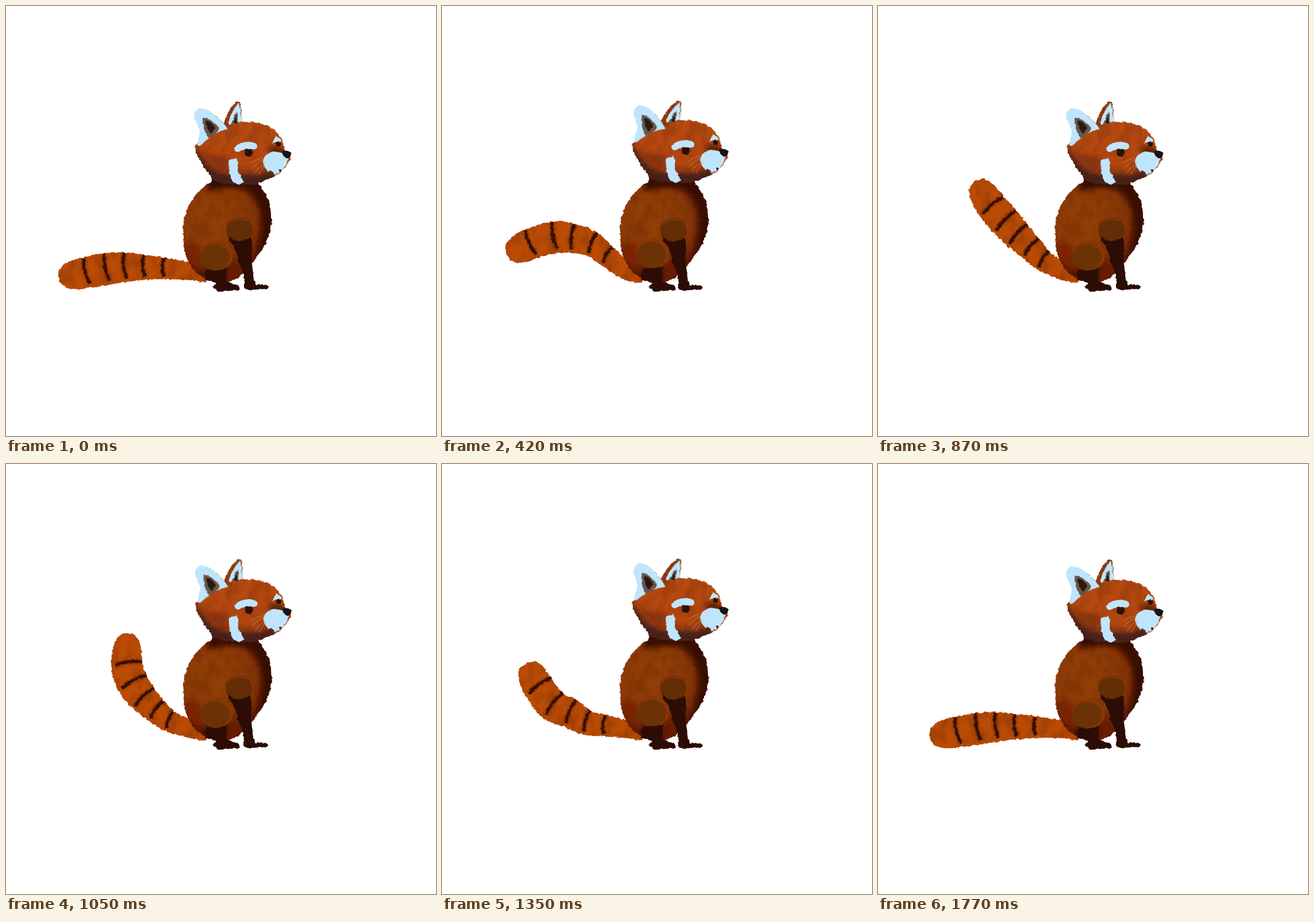
Recreate the animation shown at these times as an HTML page. Size 748 px wide and 748 px high, loop 1800 ms.

```html
<!DOCTYPE html>
<html lang="en">
<head>
<meta charset="utf-8">
<title>Red panda</title>
<style>
  html, body { margin: 0; width: 100%; height: 100%; overflow: hidden; background: #fff; }
  svg { display: block; width: 100vw; height: 100vh; }
  .line { fill: none; stroke-linecap: round; stroke-linejoin: round; }
  .ring { fill: none; }
</style>
</head>
<body>
<svg viewBox="0 0 748 748">
  <defs>
    <!-- ragged edge plus faint mottling -->
    <filter id="fur" color-interpolation-filters="sRGB">
      <feTurbulence type="fractalNoise" baseFrequency=".17" numOctaves="3" result="grain"/>
      <feDisplacementMap in="SourceGraphic" in2="grain" scale="5" xChannelSelector="R" yChannelSelector="G" result="shape"/>
      <feTurbulence type="fractalNoise" baseFrequency=".05 .035" numOctaves="3" seed="4"/>
      <feColorMatrix values="0 0 0 0 .25  0 0 0 0 .08  0 0 0 0 0  .6 0 0 0 -.25"/>
      <feComposite in2="shape" operator="atop"/>
    </filter>
    <filter id="rough" color-interpolation-filters="sRGB">
      <feTurbulence type="fractalNoise" baseFrequency=".17" numOctaves="2" result="grain"/>
      <feDisplacementMap in="SourceGraphic" in2="grain" scale="3.5" xChannelSelector="R" yChannelSelector="G"/>
    </filter>
    <filter id="soft"><feGaussianBlur stdDeviation="4"/></filter>
    <radialGradient id="coat" gradientUnits="userSpaceOnUse" cx="366" cy="372" r="98">
      <stop offset="0" stop-color="#944006"/>
      <stop offset=".6" stop-color="#8b3905"/>
      <stop offset=".85" stop-color="#702505"/>
      <stop offset="1" stop-color="#4c1405"/>
    </radialGradient>
    <linearGradient id="face" x1=".55" y1="0" x2=".42" y2="1">
      <stop offset="0" stop-color="#b94c10"/>
      <stop offset=".65" stop-color="#b0450f"/>
      <stop offset=".85" stop-color="#903710"/>
      <stop offset="1" stop-color="#4a211a"/>
    </linearGradient>
    <clipPath id="trunk"><path d="M364 292L357 305C326 326 310 350 308 388C307 414 312 440 322 452C334 470 350 480 380 481C400 479 412 468 430 445C448 422 462 402 462 368C462 345 453 325 438 308L434 292Z"/></clipPath>
    <clipPath id="skull"><path d="M329 243C338 233 360 222 383 211C405 197 440 198 465 214C477 223 483 238 484 250L495 260C494 272 488 283 465 297Q446 307 432 310Q385 313 358 302C350 282 330 268 329 243Z"/></clipPath>
  </defs>

  <g filter="url(#fur)">
    <path id="tail" fill="#ba4b04"/>
    <path id="shade" class="ring" stroke="#7a2e04" stroke-width="11" opacity=".35"/>
    <path id="rings" class="ring" stroke="#381002" stroke-width="5.5"/>
  </g>

  <g id="body">
    <g filter="url(#fur)"><g clip-path="url(#trunk)">
      <path fill="url(#coat)" d="M300 285H470V490H300Z"/>
      <g filter="url(#soft)">
        <path fill="#390e05" d="M350 285H470V400L435 445L445 385Q446 340 418 320Q390 312 350 322Z"/>
        <path fill="#7c2204" d="M312 420Q325 405 340 420L338 470Z"/>
        <path fill="#6a1c05" d="M385 455L430 445L400 485L380 482Z"/>
        <path fill="#35100a" d="M340 466L385 462L380 486L350 482Z"/>
      </g>
    </g></g>
  </g>

  <g id="foreleg" filter="url(#rough)">
    <circle cx="406" cy="390" r="23" fill="#632d05"/>
    <path class="line" d="M385 378Q403 363 426 374" stroke="#7d3308" stroke-width="5"/>
    <path fill="#2c0c05" d="M388 400Q398 412 410 408L427 403Q429 425 427 443Q430 462 431 478L436 485Q450 482 457 488L455 492L422 494Q414 492 413 487L415 476Q412 458 404 445Q402 425 388 407Z"/>
  </g>
  <g filter="url(#rough)">
    <path fill="#2c0c05" d="M350 456L385 454L383 478L393 483L405 487L407 494L370 497L360 489L366 482L346 476Z"/>
    <g id="thigh">
      <ellipse cx="366" cy="434" rx="29" ry="26" fill="#873606"/>
      <ellipse cx="363" cy="437" rx="26" ry="23" fill="#6b3205"/>
    </g>
  </g>

  <g id="head">
    <g id="farEar" filter="url(#rough)">
      <path fill="#8b390c" d="M378 207Q384 182 401 166L407 167L411 204L385 214Z"/>
      <path fill="#bfe5fd" d="M405 168L411 202L387 206Q389 186 405 168Z"/>
      <path fill="#5e4a3f" d="M401 184L404 203L392 205Z"/>
      <path fill="#2c1a12" d="M400 192L402 203L395 205Z"/>
    </g>
    <g filter="url(#fur)"><g clip-path="url(#skull)">
      <path fill="url(#face)" d="M320 190H500V320H320Z"/>
      <g filter="url(#soft)">
        <path fill="#46201a" d="M322 238L335 254Q348 279 375 292L440 294L468 286L470 315H340Z"/>
        <path fill="#80300e" d="M338 248Q352 262 390 262L388 290Q352 282 338 248Z" opacity=".6"/>
        <path fill="#3a1206" d="M452 251L462 246L484 248L488 257L464 254Z"/>
      </g>
    </g></g>
    <g id="nearEar" filter="url(#rough)">
      <path fill="#8b390c" d="M345 179Q368 190 384 211L376 218Z"/>
      <path fill="#bfe5fd" d="M327 187Q331 178 342 178L351 181Q370 194 386 213L363 222Q349 231 338 244L333 241L337 216Q327 200 327 187Z"/>
      <path fill="#69564a" d="M342 194Q360 197 371 213Q362 228 352 229Q341 214 342 194Z"/>
      <path fill="#2b1a13" d="M347 198Q360 202 364 213L357 222Q346 211 347 198Z"/>
    </g>
    <g filter="url(#rough)">
      <path class="line" stroke="#bfe5fd" stroke-width="12" d="M403 248Q417 239 431 244"/>
      <path fill="#bfe5fd" d="M462 240L466 233L469 226L475 229L479 236Q470 235 462 240Z"/>
      <path fill="#bfe5fd" d="M388 267L401 264Q404 275 403 286L414 306L405 311Q393 309 390 296Q386 282 388 267Z"/>
      <path fill="#bfe5fd" d="M447 270Q450 256 466 253L482 256L491 265Q490 282 467 294Q464 285 456 287Q448 281 447 270Z"/>
      <path fill="#2c1009" d="M415 255Q416 247 424 248Q431 251 428 258Q422 265 415 259Z"/>
      <ellipse cx="474" cy="240" rx="4.5" ry="4.5" fill="#2c1009"/>
      <path fill="#14151a" d="M480 253Q488 249 496 255Q496 265 488 265Q481 261 480 253Z"/>
      <circle cx="477" cy="286" r="2" fill="#4a1710"/>
    </g>
    <path class="line" stroke="#c79a6c" stroke-width=".9" opacity=".75" d="M449 267Q437 272 427 283M451 272Q440 280 432 291M452 276Q444 284 440 293M447 264Q437 266 426 273"/>
  </g>
</svg>
<script>
const LOOP = 1800;
const $ = id => document.getElementById(id);
const root = [[352, 471], [322, 462]];
const widths = [11, 15, 19, 22, 26, 28, 27];

// Tail poses: time, then the five ring centres and the tip
const poses = [
  [-15, 273, 457, 239, 456, 206, 456, 174, 459, 139, 465, 91, 473],
  [180, 278, 449, 244, 438, 208, 434, 180, 438, 145, 449, 98, 466],
  [420, 286, 434, 260, 414, 226, 404, 195, 403, 154, 414, 113, 434],
  [660, 289, 438, 267, 414, 240, 393, 213, 378, 176, 371, 127, 370],
  [1050, 283, 446, 260, 428, 238, 406, 219, 379, 210, 346, 213, 294],
  [1350, 281, 455, 250, 449, 222, 433, 192, 419, 167, 386, 147, 346],
  [1700, 271, 460, 236, 459, 202, 461, 169, 465, 132, 470, 84, 476]
].map(([time, ...xy]) => {
  let [px, py] = root[1];
  const joints = [];
  for (let i = 0; i < xy.length; i += 2) {
    const dx = px - xy[i], dy = py - xy[i + 1];
    joints.push(Math.atan2(dy, dx), Math.hypot(dx, dy));
    [px, py] = [xy[i], xy[i + 1]];
  }
  return { time, joints };
});

function poseAt(i) {
  const n = poses.length, k = (i + n) % n;
  return { time: poses[k].time + LOOP * Math.floor(i / n), joints: poses[k].joints };
}

const hermite = (a, b, ma, mb, s) =>
  a + s * ma + s * s * (3 * (b - a) - 2 * ma - mb) + s * s * s * (2 * (a - b) + ma + mb);

function tailNodes(t) {
  let i = 0;
  while (poseAt(i + 1).time <= t) i++;
  const [p, a, b, q] = [i - 1, i, i + 1, i + 2].map(poseAt);
  const span = b.time - a.time, s = (t - a.time) / span;
  const joints = a.joints.map((v, j) => hermite(v, b.joints[j],
    (b.joints[j] - p.joints[j]) / (b.time - p.time) * span,
    (q.joints[j] - v) / (q.time - a.time) * span, s));
  const nodes = [...root];
  let [x, y] = root[1];
  for (let j = 0; j < joints.length; j += 2) {
    x -= Math.cos(joints[j]) * joints[j + 1];
    y -= Math.sin(joints[j]) * joints[j + 1];
    nodes.push([x, y]);
  }
  return nodes;
}

// Point, direction and half width at position u along the tail
function along(nodes, u) {
  const last = nodes.length - 1, i = Math.min(Math.floor(u), last - 1), s = u - i;
  const at = k => nodes[Math.max(0, Math.min(last, k))];
  const spot = v => [0, 1].map(c => hermite(at(i)[c], at(i + 1)[c],
    (at(i + 1)[c] - at(i - 1)[c]) / 2, (at(i + 2)[c] - at(i)[c]) / 2, v));
  const [x, y] = spot(s), [x0, y0] = spot(s - .01), [x1, y1] = spot(s + .01);
  const len = Math.hypot(x1 - x0, y1 - y0);
  const w = i < last - 1 ? widths[i] + (widths[i + 1] - widths[i]) * s
    : widths[i] * Math.sqrt(Math.max(0, 1 - s ** 2.2));
  return { x, y, w, tx: (x1 - x0) / len, ty: (y1 - y0) / len };
}

// Moves off the centre line by `side` half widths and `ahead` pixels
const off = ({ x, y, w, tx, ty }, side, ahead = 0) =>
  `${(x - ty * w * side + tx * ahead).toFixed(1)} ${(y + tx * w * side + ty * ahead).toFixed(1)}`;

function drawTail(t) {
  const nodes = tailNodes(t), upper = [], lower = [];
  for (let k = 0; k <= 140; k++) {
    const p = along(nodes, k / 20);
    upper.push(off(p, 1));
    lower.unshift(off(p, -1));
  }
  $('tail').setAttribute('d', `M${upper.concat(lower).join('L')}Z`);
  const rings = [2, 3, 4, 5, 6].map(u => {
    const p = along(nodes, u);
    return `M${off(p, .97)}Q${off(p, .1, 5)} ${off(p, -.75, -3)}`;
  }).join('');
  $('rings').setAttribute('d', rings);
  $('shade').setAttribute('d', rings);
}

const move = (id, value) => $(id).setAttribute('transform', value);

function draw(now) {
  const t = now % LOOP;
  const breath = (1 - Math.cos((t + 15) / 900 * 2 * Math.PI)) / 2;
  drawTail(t);
  move('body', `translate(${1.7 * breath} 0)`);
  move('foreleg', `translate(${-3.5 * breath} ${breath})`);
  move('thigh', `translate(${breath} ${-4 * breath})`);
  move('head', `translate(${2 * breath} ${-3 * breath})`);
  move('nearEar', `rotate(${7 * breath} 362 224)`);
  move('farEar', `rotate(${10 * breath} 396 208)`);
}

const start = performance.now();
function tick() {
  draw(performance.now() - start);
  requestAnimationFrame(tick);
}
tick();
</script>
</body>
</html>
```
